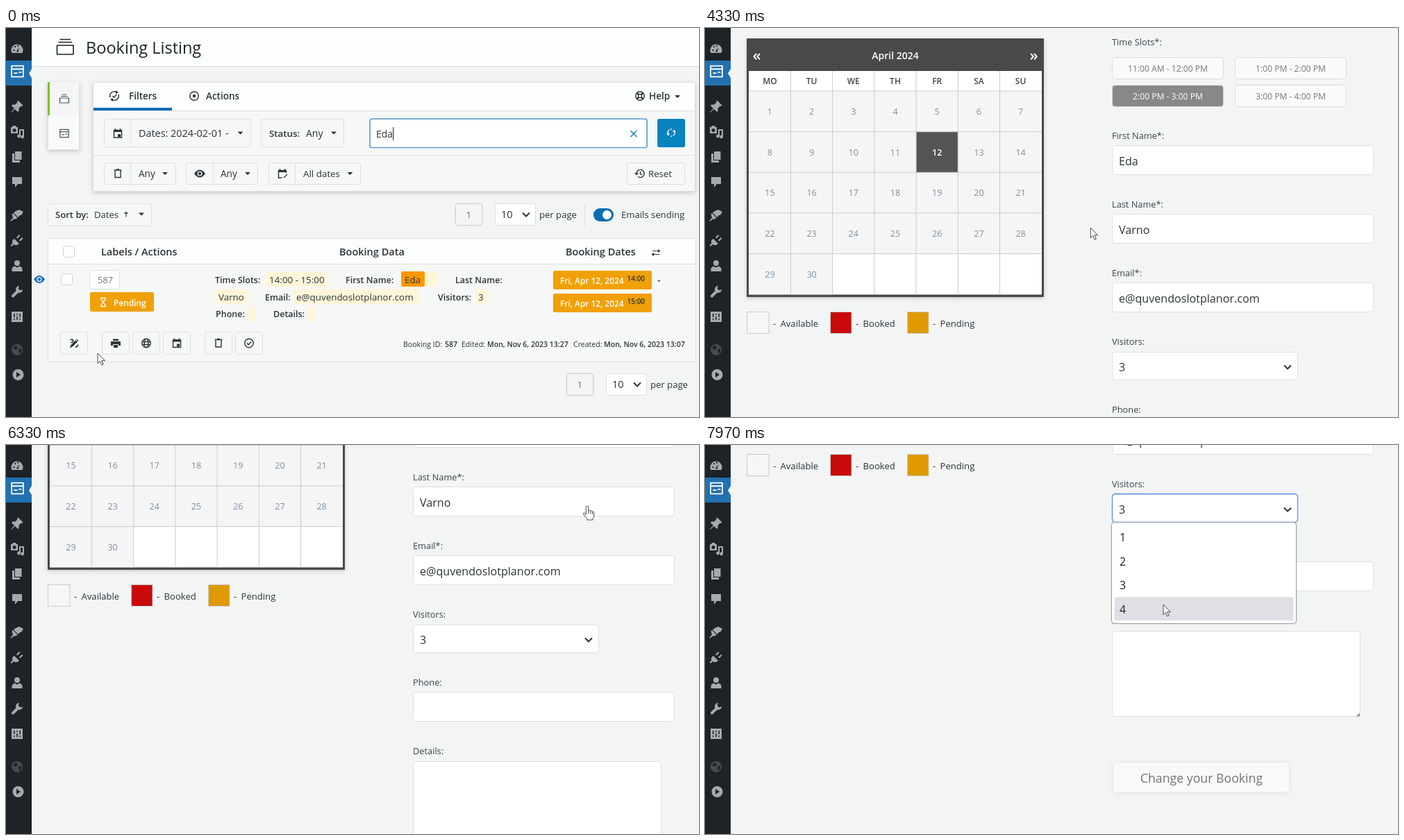
An HTML page that plays this animation: 998 px wide and 561 px high, repeating every 8000 ms.

```html
<!DOCTYPE html>
<html lang="en">
<head>
<meta charset="utf-8">
<title>Booking admin</title>
<style>
html, body { margin: 0; width: 100%; height: 100%; overflow: hidden; background: #f3f5f5; }
svg { display: block; width: 100vw; height: 100vh; font-family: "Open Sans", "Noto Sans", sans-serif; }
text { white-space: pre; }
.icon { fill: none; stroke: currentColor; stroke-width: 1.4; }
.icon .f { fill: currentColor; stroke: none; }
</style>
</head>
<body>
<svg id="stage" viewBox="0 0 998 561" preserveAspectRatio="none"></svg>
<script>
const INK = '#2c3338', LINE = '#dcdfe1', BLUE = '#0a6cb3', AMBER = '#f0a009';
const GUEST = { first: 'Eda', last: 'Varno', mail: 'e@quvendoslotplanor.com' };

const text = (x, y, s, size = 13, weight = 400, fill = INK, anchor = 'start') =>
  `<text x="${x}" y="${y}" font-size="${size}" font-weight="${weight}" fill="${fill}" text-anchor="${anchor}">${s}</text>`;
const mid = (x, y, s, size, weight, fill) => text(x, y, s, size, weight, fill, 'middle');
const rect = (x, y, w, h, fill, stroke, r = 0, extra = '') => {
  const d = stroke ? .5 : 0;
  return `<rect x="${x + d}" y="${y + d}" width="${w - 2 * d}" height="${h - 2 * d}" rx="${r}" fill="${fill}" stroke="${stroke || 'none'}" ${extra}/>`;
};
const line = (x1, y1, x2, y2, color = LINE, w = 1) =>
  `<path d="M${x1} ${y1}L${x2} ${y2}" stroke="${color}" stroke-width="${w}" fill="none"/>`;
const button = (x, y, w, h, split) =>
  rect(x, y, w, h, '#f6f7f7', LINE, 3) + (split ? line(split + .5, y, split + .5, y + h) : '');
const group = (id, body) => `<g id="${id}">${body}</g>`;

const path = (d, extra = '') => `<path d="${d}" ${extra}/>`;
const solid = d => path(d, 'class="f" fill-rule="evenodd"');
const dot = (r, x = 0, y = 0) => `<circle class="f" cx="${x}" cy="${y}" r="${r}"/>`;
const ring = (r, extra = '') => `<circle r="${r}" ${extra}/>`;
const ICONS = {
  stack: path('M-6.5-2h13v7h-13zM-5-4.5h10M-3.5-7h7', 'stroke-width="1.2"'),
  form: path('M-6.5-6h13v12h-13zM-6.5-2.5h13M-4 2h4M1.5 1h3', 'stroke-linejoin="round"'),
  calendar: path('M-5.5-4.5h11v10.5h-11zM-3.5-7v2.5M3.5-7v2.5') + solid('M-5.5-5h11v3h-11zM0 1h4v4h-4z'),
  calendarEdit: path('M5.5-1v-3.5h-11v10.5h5M-3.5-7v2.5M3.5-7v2.5M2 6l5-5') + solid('M-5.5-5h11v3h-11z'),
  trash: path('M-5.5-5h11M-2-6h4M-4-4v9.5h8v-9.5'),
  eye: solid('M-8 0Q0-11 8 0Q0 11-8 0zM-3.6 0a3.6 3.6 0 0 0 7.2 0a3.6 3.6 0 0 0-7.2 0z') + dot(2.2),
  down: solid('M-4-2h8l-4 4z'),
  chevron: path('M-5-2.5l5 5 5-5', 'stroke-width="2"'),
  cycle: path('M-6 2A6.2 6.2 0 0 1 3-5.4M6-2A6.2 6.2 0 0 1-3 5.4M-2.6 0l2 2 4-4') + solid('M2-8l4 3-4 2zM-2 8l-4-3 4-2z'),
  target: ring(6.2) + dot(2.2),
  buoy: ring(6.2) + ring(2.6) + path('M-4.4-4.4l2.6 2.6M4.4-4.4l-2.6 2.6M-4.4 4.4l2.6-2.6M4.4 4.4l-2.6-2.6', 'stroke-width="2.4"'),
  history: path('M-5 0a5.6 5.6 0 1 1 2 4.3M.5-3v3.5l2.5 1.5') + solid('M-8-1h6l-3 3.5z'),
  spinner: path('M-4.5 2A5 5 0 0 1 1-5M4.5-2A5 5 0 0 1-1 5', 'stroke-dasharray="7 1.5"') + solid('M-7 1h5l-2 3.5zM7-1h-5l2-3.5z'),
  cross: path('M-4.5-4.5l9 9M4.5-4.5l-9 9'),
  swap: path('M-5-2.5h9M-4 2.5h9', 'stroke-width="1.2"') + solid('M3-5l3.5 2.5-3.5 2.500zM-3 0l-3.5 2.5 3.5 2.5z'),
  arrowUp: path('M0 3.5v-7M-2.5-1l2.500-2.500 2.500 2.500', 'stroke-width="1.1"'),
  hourglass: path('M-4-6h8M-4 6h8M-3-6v2l3 4 3-4v-2M-3 6v-2l3-4 3 4v2', 'stroke-width="1.3"'),
  tools: path('M-5.5-4.5q3-2 4 0t-3 4M-3.5 4l6-6', 'stroke-width="1.6"') + path('M-3 3.500l6.500-6.500', 'stroke-width="3.6"') +
    solid('M-6 6.500l1.200-4 2.800 2.800zM4-6l2.500 2.500-1 1-2.500-2.500z') + path('M2 6q3-1 4-4', 'stroke-width="1.6"'),
  printer: solid('M-4-6h8v2.5h-8zM-7-2.5h14v6h-3v-2h-8v2h-3zM-3 2.5h6v4h-6z'),
  globe: ring(6.2) + '<ellipse rx="2.8" ry="6.2"/>' + path('M-6-2h12M-6 2h12'),
  check: ring(6.2) + path('M-3 0l2.2 2.3 4-4.3'),
  gauge: solid('M-7.5 6a8.5 8.5 0 1 1 15 0zM-1 4l4-6-1.5 7zM-5.5 1h2v2h-2zM-4-4h2v2h-2zM0-5.5h2v2h-2z'),
  pin: solid('M1.5-8.5l7 7-1.5 1.500-1.500-.5-3 3.500 0 4-1.500 1-4-4-5.500 5-.5-.5 5-5.500-4-4 1-1.500 4 0 3.500-3-.5-1.500z'),
  media: solid('M-9-7h2l1-2h4l1 2h2v9h-10zM-6.5-2.5a2.500 2.500 0 0 0 5 0a2.500 2.500 0 0 0-5 0z') + path('M4 6v-9h5v10', 'stroke-width="2"') + dot(2.4, 2.500, 6) + dot(2.4, 7.500, 7),
  pages: solid('M-3-8h9.5v12h-9.5zM-7-5h3v10h8v3h-11z'),
  bubble: solid('M-7-7h14v10h-6l-4 5v-5h-4z'),
  brush: solid('M3-8l6 3-3 5-2 0-2.500 3-6.500-6.500 3-2.500zM-6-3l6.500 6.500-2 2-3 0-5 3.500-.5-.5 4-5-1.500-5z'),
  plug: solid('M-4-3l7 7q-4 4-8 1l-3 3-1.5-1.5 3-3q-2-4 2.5-6.5zM-1-5l4-4 1.5 1.5-4 4zM3-1l4-4 1.5 1.5-4 4z'),
  user: dot(4, 0, -4) + solid('M-7.5 8v-4q1-3 4-3.5l3.5 2 3.5-2q3 .5 4 3.5v4z'),
  wrench: path('M-6 6.5l7-7', 'stroke-width="4" stroke-linecap="round"') + solid('M8-3a5 5 0 1 1-5-5l-1.5 3.5 3 3z'),
  sliders: solid('M-8-7h16v15h-16zM-5-4h1.5v9h-1.5zM-.7-4h1.5v9h-1.5zM3.5-4h1.5v9h-1.5z') + solid('M-6 1h3.5v2h-3.5zM-1.7-2h3.5v2h-3.5zM2.5 1h3.5v2h-3.5z'),
  earth: solid('M-8 0a8 8 0 1 1 16 0a8 8 0 1 1-16 0zM-5-4l4-2 2 3-3 3-3-1zM2 0l4-2v5l-3 3z'),
  play: solid('M-8 0a8 8 0 1 1 16 0a8 8 0 1 1-16 0zM-2.5-4v8l6-4z')
};
const icon = (name, x, y, color = INK, scale = 1) =>
  `<g class="icon" transform="translate(${x} ${y}) scale(${scale})" color="${color}">${ICONS[name]}</g>`;

function sidebar() {
  const items = { gauge: 30, pin: 113, media: 150, pages: 186, bubble: 222, brush: 270, plug: 307, user: 343, wrench: 380, sliders: 416, play: 500 };
  return rect(0, 0, 37, 561, '#1d2327') + rect(0, 47, 37, 36, '#2271b1') +
    path('M37 59v13l-4-6.5z', 'fill="#f3f5f5"') + icon('form', 16.5, 62.5, '#fff', 1.3) +
    icon('earth', 16, 464, '#464b50') +
    Object.entries(items).map(([name, y]) => icon(name, name === 'play' ? 17.5 : 16, y, '#a7aaad')).join('');
}

function pager(x, y) {
  return rect(x, y, 39, 32, '#f3f4f5', '#cfd3d6', 3, 'filter="url(#soft)"') + mid(x + 19.5, y + 21, '1', 13, 400, '#646970') +
    rect(x + 57, y, 59, 32, '#fdfefe', LINE, 3) + text(x + 66, y + 21, '10', 14.6) +
    icon('chevron', x + 102, y + 16) + text(x + 121, y + 21, 'per page', 13.1);
}

function filters() {
  return rect(125, 78, 868, 158, '#f6f7f7', LINE, 1, 'filter="url(#shade)"') + rect(126, 79, 866, 40, '#fdfefe') +
    line(125, 119.5, 993, 119.5) + line(125, 183.5, 993, 183.5) + rect(126, 115, 113, 4, BLUE) +
    icon('cycle', 156, 98) + text(177, 103, 'Filters', 13.5, 600) +
    icon('target', 271, 98) + text(288, 103, 'Actions', 13.5, 600) +
    icon('buoy', 913, 98) + text(926, 103, 'Help', 13.5, 600) + icon('down', 967, 99) +
    button(141, 131, 212, 41, 179) + icon('calendar', 161, 152) + text(191, 157, 'Dates: 2024-02-01 -', 14.4) + icon('down', 337.5, 151.5) +
    button(367, 131, 120, 41) + text(379, 157, 'Status:', 13.3, 600) + text(432, 157, 'Any', 14) + icon('down', 472, 151.5) +
    rect(524, 131, 400, 42, '#fff', '#c9ced2', 3) +
    group('focus', rect(523.5, 130.5, 400, 42.5, 'none', '#5a9fd4', 3, 'stroke-width="1.6"') + line(557.8, 143, 557.8, 162, '#111')) +
    text(533, 158, GUEST.first, 13.9) + icon('cross', 904, 152.5, '#1a78b8') +
    rect(938, 131, 40, 41, '#0783be', null, 3) + icon('spinner', 958, 151, '#fff') +
    button(141, 194, 104, 32, 179) + icon('trash', 161, 210) + text(191, 215, 'Any', 13.6) + icon('down', 229, 210) +
    button(259, 194, 104, 32, 298) + icon('eye', 279, 210) + text(309, 215, 'Any', 13.6) + icon('down', 348, 210) +
    button(378, 194, 133, 32, 416) + icon('calendarEdit', 398, 210) + text(428, 215, 'All dates', 13.4) + icon('down', 495.5, 210) +
    button(894, 194, 84, 32) + icon('history', 913, 210) + text(925, 215, 'Reset', 13.2);
}

function bookingRow() {
  const marks = [[374, 352, 90], [603, 352, 18], [301, 377, 47], [414, 377, 182], [675, 377, 18], [348, 402, 10], [434, 402, 11]];
  const labels = [['Time Slots:', 301, 368], ['First Name:', 489, 368], ['Last Name:', 647, 368], ['Email:', 373, 393],
    ['Visitors:', 622, 393], ['Phone:', 302, 417], ['Details:', 385, 417]];
  const values = [['14:00 - 15:00', 379, 368], [GUEST.first, 574, 368], [GUEST.last, 306, 393], [GUEST.mail, 418, 393], ['3', 680, 393]];
  const footer = [['Booking ID:', 572], ['587', 632, 600], ['Edited:', 656], ['Mon, Nov 6, 2023 13:27', 693, 600], ['Created:', 817], ['Mon, Nov 6, 2023 13:07', 861, 600]];
  const actions = [['tools', 78], ['printer', 138], ['globe', 182], ['calendar', 226], ['trash', 286], ['check', 330]];
  const chip = (y, time) => rect(788, y, 142, 27, AMBER, null, 2) + text(798, y + 19, 'Fri, Apr 12, 2024', 11.9, 600, '#fff') + text(894.5, y + 15, time, 10, 600);
  return icon('eye', 48, 362.5, '#1a6db5') + rect(79, 354, 17, 17, '#fff', '#cdd1d4', 3) +
    rect(120, 349, 44, 28, '#fff', LINE, 3) + mid(143, 368, '587', 12.9, 400, '#72777c') +
    rect(121, 381, 92, 28, AMBER, null, 2) + icon('hourglass', 140, 395.5, '#fff') + text(155, 401, 'Pending', 11.9, 600, '#fff') +
    marks.map(([x, y, w]) => rect(x, y, w, 21, '#fef6d8')).join('') + rect(569, 351, 34, 22, '#ff9800', null, 2) +
    labels.map(([s, x, y]) => text(x, y, s, 12.5, 600)).join('') +
    values.map(([s, x, y]) => text(x, y, s, 13.4)).join('') +
    chip(350, '14:00') + chip(383, '15:00') + text(938, 368, '-', 14, 600) +
    actions.map(([name, x]) => button(x, 438, 40, 33) + icon(name, x + 20, 454.5)).join('') +
    footer.map(([s, x, w]) => text(x, 460, s, 10.55, w)).join('');
}

function listing() {
  return rect(37, 0, 961, 55, '#fcfefe') + line(37, 55.5, 998, 55.5) +
    path('M73.5 25h23.5v13h-23.5zM75.5 20.5h19.500M77.500 16.5h15.500', 'fill="none" stroke="#1d2327" stroke-width="1.6" stroke-linejoin="round"') +
    text(115, 37, 'Booking Listing', 23.5, 400, '#1d2327') +
    rect(60, 78, 46, 98, '#f9fafa', LINE, 1, 'filter="url(#shade)"') + rect(60, 78, 45, 48, '#f4f5f5') + rect(60, 78, 3, 48, '#7ac420') +
    icon('stack', 84, 103, '#50575e') + icon('form', 84, 152, '#50575e', .95) + filters() +
    button(60, 253, 150, 33) + text(71, 274, 'Sort by:', 13.1, 600) + text(127, 274, 'Dates', 13.1) + icon('arrowUp', 173, 269) + icon('down', 195, 268.5) +
    pager(647, 253) + line(833.5, 253, 833.5, 286) + rect(846, 260, 29, 19, BLUE, null, 9.5) +
    '<circle cx="865.5" cy="269.5" r="6.5" fill="#fff"/>' + text(886, 274, 'Emails sending', 13.1) +
    rect(60, 303, 934, 179, '#f6f7f7', LINE) + rect(61, 304, 932, 36, '#fcfdfd') + line(60, 340.5, 993, 340.5) +
    rect(82, 314, 17, 17, '#fff', '#cdd1d4', 3) + text(137, 328, 'Labels / Actions', 14.5, 600) +
    text(480, 328, 'Booking Data', 14.5, 600) + text(806, 328, 'Booking Dates', 14.5, 600) + icon('swap', 936, 324) +
    bookingRow() + pager(807, 498) +
    group('tip', rect(78, 396, 103, 32, '#333', null, 4) + path('M92 428h11l-5.5 5.5z', 'fill="#333"') + mid(130, 418, 'Edit Booking', 14.4, 400, '#fff'));
}

function calendar() {
  const cw = 60.2, ch = 58.65, left = 63.3, top = 91;
  let s = rect(60, 15, 428, 373, '#4a4a4a', null, 1, 'filter="url(#shade)"') + rect(63, 62, 422, 322.5, '#fff') +
    mid(274, 45, 'April 2024', 14, 600, '#fff') + mid(74.5, 47, '«', 22, 600, '#fff') + mid(473.5, 47, '»', 22, 600, '#fff');
  for (let d = 0; d < 30; d++) {
    const x = left + d % 7 * cw, y = top + Math.floor(d / 7) * ch, on = d === 11;
    s += rect(x, y, cw, ch, on ? '#555' : '#f6f5f6') + mid(x + cw / 2, y + 34, d + 1, 12.6, on ? 600 : 500, on ? '#fff' : '#7890a3');
  }
  'MO TU WE TH FR SA SU'.split(' ').forEach((day, i) => {
    s += mid(left + (i + .5) * cw, 81, day, 12, 600, '#444');
    if (i) s += line(left + i * cw, 62, left + i * cw, 384.5, '#cbcbcb');
  });
  for (let r = 0; r < 5; r++) s += line(63, top + r * ch, 485, top + r * ch, '#cbcbcb');
  const legend = [['Available', 60, '#f7f5f6', 98], ['Booked', 180, '#c80a0a', 217], ['Pending', 291, '#df9a00', 328]];
  return s + legend.map(([name, x, fill, tx], i) => rect(x, 409, i ? 31.5 : 32.5, 32, fill, '#cbcbcb') +
    text(tx, 431, '-', 13.1) + text(tx + 10.5, 431, name, 13.1)).join('');
}

const slots = [['11:00 AM - 12:00 PM', 586, 42], ['1:00 PM - 2:00 PM', 763, 42], ['2:00 PM - 3:00 PM', 586, 82], ['3:00 PM - 4:00 PM', 763, 82]];
function form() {
  const label = (y, s) => text(586, y, s, 12.8, 400, '#3c434a');
  const field = (y, s = '') => rect(586, y, 377, 43, '#fff', LINE, 4) + text(596, y + 29, s, 16.1);
  return label(25, 'Time Slots*:') +
    slots.map(([s, x, y], i) => group('slot' + i, rect(x, y, 161, 32, '#fafafa', '#dcdcdc', 4) + mid(x + 80.5, y + 21, s, 12.1, 400, '#777'))).join('') +
    label(160, 'First Name*:') + field(169, GUEST.first) + label(259, 'Last Name*:') + field(268, GUEST.last) +
    label(358, 'Email*:') + field(367, GUEST.mail) + label(457, 'Visitors:') +
    rect(586, 467, 268, 41, '#fff', LINE, 4) + text(596, 495, '3', 16) + icon('chevron', 839, 489) +
    label(555, 'Phone:') + field(564) + label(654, 'Details:') +
    rect(586, 664, 358, 124, '#fff', LINE, 4) + path('M943 782v5.5h-5.5z', 'fill="#999"') +
    rect(587, 853, 255, 44, '#f8f9f9', '#e8e9e9', 5, 'filter="url(#faint)"') + mid(715, 883, 'Change your Booking', 17.7, 400, '#757575') +
    group('menu', rect(586, 466, 268, 42, 'none', '#5b98dd', 4, 'stroke-width="1.4"') +
      rect(585, 507, 267, 147, '#fff', '#9a9da1', 4, 'filter="url(#soft)"') +
      '<rect id="option" x="589.5" width="258" height="34" rx="2" fill="#e1dfe6"/>' +
      [1, 2, 3, 4].map(n => text(597, 501 + n * 34.4, n, 16, 400, '#222')).join(''));
}

const shadow = (id, dy, blur, alpha) =>
  `<filter id="${id}" x="-20%" y="-20%" width="140%" height="140%"><feDropShadow dx="0" dy="${dy}" stdDeviation="${blur}" flood-opacity="${alpha}"/></filter>`;
const outline = 'fill="#fff" stroke="#333" stroke-width=".9" stroke-linejoin="round"';
const $ = id => document.getElementById(id);
$('stage').innerHTML = `<defs>${shadow('shade', 2, 3, .18)}${shadow('soft', 0, 1, .15)}${shadow('faint', 2, 4, .06)}</defs>` +
  rect(0, 0, 998, 561, '#f3f5f5') + group('list', listing()) + group('edit', calendar() + form()) + sidebar() +
  '<circle id="click" r="13.5" fill="#f4e722"/>' +
  group('cursor', group('arrow', path('M0 0V14.6l3.4-3.1 2.4 5.5 2.3-1-2.4-5.3h4.8z', outline)) +
    group('hand', path('M-1.7 1.7Q-1.7 0 0 0T1.7 1.7V7.2Q1.8 6 3.2 6.2T4.8 7.6Q5 6.6 6.3 7T7.6 8.6Q8 7.8 9 8.2T9.8 9.8V14Q9.8 16.5 8 18.5V20H0V18.5Q-3.5 15-5.5 11.5Q-6 10-4.6 9.7T-1.7 12.2Z', outline) +
      path('M1.7 7v4M4.8 8v3.5M7.6 9v3', 'stroke="#333" fill="none" stroke-width=".9"')));

const LOOP = 8000;
// Rows: time, then the values to blend between
const CURSOR = [[1500, 132, 469], [1590, 116, 461], [1680, 94, 452], [4100, 94, 452], [4200, 270, 394], [4330, 554, 289],
  [4450, 710, 190], [4600, 803, 120], [4780, 837, 88], [7560, 837, 88], [7650, 800, 112], [7760, 725, 165], [7860, 678, 213], [7950, 660, 230]];
const SCROLL = [[6005, 0], [6080, 39], [6500, 322], [6620, 380], [6700, 392], [6780, 396]];
const CLICKS = [3740, 5050, 7420];

function at(track, t) {
  const i = track.findIndex(row => row[0] > t);
  if (i === 0) return track[0].slice(1);
  if (i < 0) return track[track.length - 1].slice(1);
  const a = track[i - 1], b = track[i], k = (t - a[0]) / (b[0] - a[0]);
  return a.slice(1).map((v, n) => v + (b[n + 1] - v) * k);
}
const clamp = v => Math.max(0, Math.min(1, v));
const show = (id, on) => $(id).setAttribute('visibility', on ? 'inherit' : 'hidden');

function render(t) {
  const [x, y] = at(CURSOR, t), scroll = Math.round(at(SCROLL, t)[0]);
  const editing = t >= 4120, open = t >= 7520;
  show('list', !editing);
  show('edit', editing);
  show('focus', t < 3770);
  show('menu', open);
  $('tip').setAttribute('opacity', clamp((t - 1620) / 110));
  $('edit').setAttribute('transform', `translate(0 ${-scroll})`);

  const picked = t < 5140 ? 2 : 3;
  slots.forEach((_, i) => {
    const [box, label] = $('slot' + i).children;
    box.setAttribute('fill', i === picked ? '#888' : '#fafafa');
    label.setAttribute('fill', i === picked ? '#fff' : '#777');
  });
  const option = y < 115 ? 2 : Math.min(3, Math.floor((y - 115) / 34.4));
  $('option').setAttribute('y', 512 + option * 34.4);

  const hand = (t >= 1620 && t < 4120) || (t >= 4640 && !open);
  show('hand', hand);
  show('arrow', !hand);
  $('cursor').setAttribute('transform', `translate(${x} ${y})`);
  const since = Math.min(...CLICKS.map(c => t >= c ? t - c : LOOP));
  $('click').setAttribute('opacity', since < 230 ? .78 * clamp((230 - since) / 130) : 0);
  $('click').setAttribute('cx', x - .5);
  $('click').setAttribute('cy', y + .5);
}

const start = performance.now();
function tick() {
  render((performance.now() - start) % LOOP);
  requestAnimationFrame(tick);
}
tick();
</script>
</body>
</html>
```
